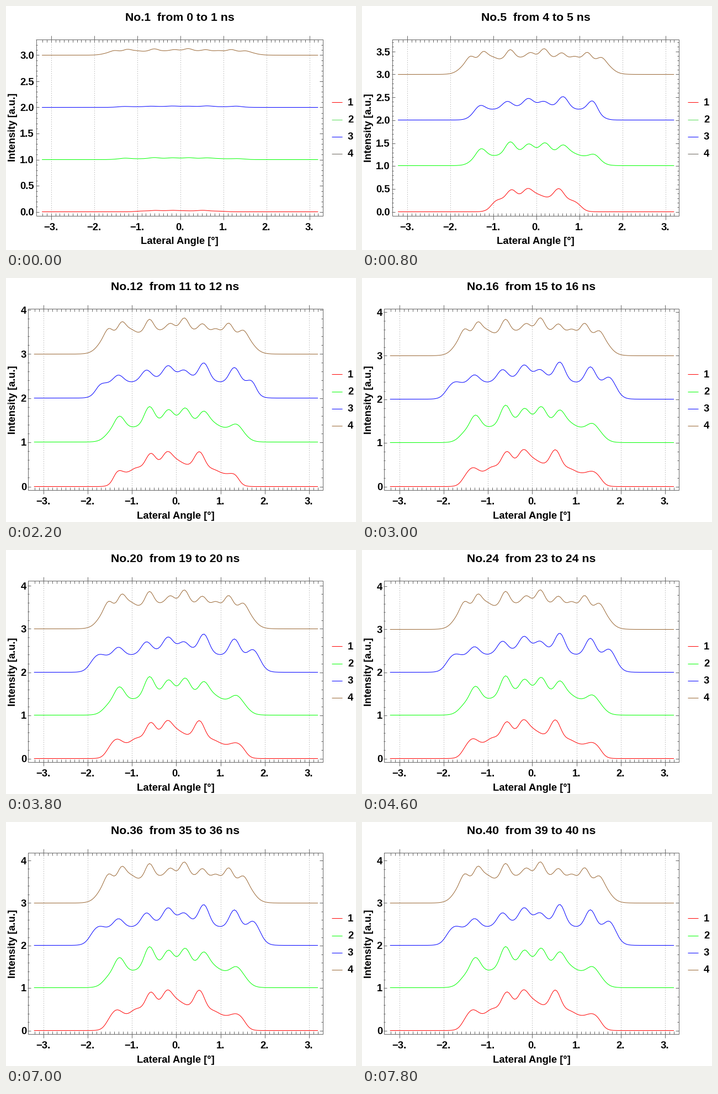
These frames come from a looping animation (634x444 px, 8 s). A matplotlib script:

```python
import math

import matplotlib.pyplot as plt
import numpy as np
from matplotlib.animation import FuncAnimation

W, H, DPI = 634, 444, 100
PX = 72 / DPI
FRAMES, STEP = 40, 200
SWITCH = 10          # first frame that uses the wide layout
RIGHT = 573
GRAY = "#666666"
COLORS = ["#ff0000", "#00ff00", "#0000ff", "#996633"]
NARROW_KEYS = ["#ff0000", "#58dc58", "#0000ff", "#6a655c"]
ANGLES = np.linspace(-3.2, 3.2, 161)

plt.rcParams["font.family"] = "Liberation Sans"
plt.rcParams["font.weight"] = "bold"

NARROW = dict(left=54, top=61, bottom=381, zero=374, peak=78, x0=315.2, dx=78,
              title=(314.5, 27), xtick=408, xlabel=(314, 433), edge=51,
              keys=NARROW_KEYS, major=0.5, minor=0.1, fmt="{:.1f}")
WIDE = dict(left=39, top=56, bottom=385, zero=379, peak=73, x0=307.9, dx=80.2,
            title=(306.5, 22), xtick=412, xlabel=(307, 438), edge=37,
            keys=COLORS, major=1, minor=0.2, fmt="{:.0f}")

# Each profile: a domed plateau with bumps (angle, height) of one width,
# cut off by soft edges that move outwards while the intensity builds up.
PROFILES = [
    dict(start=0.03, level=0.32, dome=0.5, edges=(1.07, 1.58), soft=0.06,
         width=0.17,
         bumps=[(-1.34, .17), (-.9, .14), (-.57, .49), (-.2, .46), (.03, .17),
                (.22, .08), (.53, .53), (.85, .09), (1.37, .08)]),
    dict(start=0.04, level=0.36, dome=0.55, edges=(1.52, 1.62), soft=0.08,
         width=0.16,
         bumps=[(-1.28, .35), (-.6, .5), (-.17, .34), (.21, .39), (.63, .37),
                (.85, .08), (1.37, .15)]),
    dict(start=0.03, level=0.4, dome=0.45, edges=(1.5, 1.95), soft=0.07,
         width=0.16,
         bumps=[(-1.75, .07), (-1.3, .22), (-.67, .28), (-.18, .32),
                (.18, .2), (.63, .47), (1.32, .43), (1.75, .2)]),
    dict(start=0.13, level=0.51, dome=0.3, edges=(1.75, 1.75), soft=0.09,
         width=0.13,
         bumps=[(-1.53, .23), (-1.22, .34), (-1.02, .11), (-.6, .34),
                (-.13, .17), (.19, .32), (.6, .22), (.9, .13), (1.19, .31),
                (1.53, .18)]),
]


def gain(n, start):
    """Fast turn-on followed by a slow drift to full intensity."""
    rise = 0.85 * (1 - math.exp(-n / 4.5)) + 0.15 * min(n / 36, 1)
    return start + (1 - start) * rise


def ease(t):
    t = min(max(t, 0), 1)
    return t * t * (3 - 2 * t)


def profile(p, n):
    inner, outer = p["edges"]
    edge = inner + (outer - inner) * ease((n - 6) / 8)
    y = p["level"] * (1 + p["dome"] * np.exp(-(ANGLES / 0.8) ** 2))
    for centre, height in p["bumps"]:
        y += height * np.exp(-((ANGLES - centre) / p["width"]) ** 2)
    window = 1 / (1 + np.exp((np.abs(ANGLES) - edge) / p["soft"]))
    return gain(n, p["start"]) * y * window


fig = plt.figure(figsize=(W / DPI, H / DPI), dpi=DPI, facecolor="white")
ax = fig.add_axes([0, 0, 1, 1])


def snap(v):
    return math.floor(v) + 0.5


def text(x, y, s, size=18.5, ha="center", **kw):
    ax.text(x, y, s, fontsize=size * PX, ha=ha, va="baseline", color="black",
            **kw)


def segments(parts):
    xs, ys = [], []
    for xa, ya, xb, yb in parts:
        xs += [xa, xb, np.nan]
        ys += [ya, yb, np.nan]
    ax.plot(xs, ys, color=GRAY, lw=PX, solid_capstyle="butt", zorder=2)


def draw_x_axis(lay):
    top, bottom = lay["top"], lay["bottom"]
    ticks = []
    for k in range(-32, 33):
        centre = lay["x0"] + lay["dx"] * k / 10
        x = snap(centre)
        major = k % 10 == 0
        out = 7 if major else 0
        ticks += [(x, top - out, x, top + 5),
                  (x, bottom + 1 + out, x, bottom - 4)]
        if major:
            ax.plot([x, x], [top + 1, bottom], color="#8c8c8c", lw=PX,
                    ls=(0, (1, 3)), dash_capstyle="butt", zorder=1)
            text(centre, lay["xtick"], f"{k // 10}.".replace("-", "\u2212"))
    segments(ticks)


def draw_y_axis(lay, scale):
    ticks = []
    every = round(lay["major"] / lay["minor"])
    count = int((lay["zero"] - lay["top"]) / scale / lay["minor"])
    for k in range(count + 1):
        y = snap(lay["zero"] - k * lay["minor"] * scale)
        major = k % every == 0
        size = 6 if major else 3
        ticks += [(lay["left"], y, lay["left"] + size, y),
                  (RIGHT + 1, y, RIGHT + 1 - size, y)]
        if major:
            text(lay["edge"], round(y + 6.6),
                 lay["fmt"].format(k * lay["minor"]), ha="right")
    segments(ticks)


def draw_frame(lay):
    l, r = lay["left"] + 0.5, RIGHT + 0.5
    t, b = lay["top"] + 0.5, lay["bottom"] + 0.5
    ax.plot([l, r, r, l, l], [t, t, b, b, t], color=GRAY, lw=PX, zorder=2,
            solid_joinstyle="miter")


def draw_legend(lay):
    for i, color in enumerate(lay["keys"]):
        y = 175.5 + 31 * i
        ax.plot([590, 609], [y, y], color=color, lw=PX, solid_capstyle="butt")
        text(619, 181 + 31 * i, str(i + 1), ha="left")


def update(n):
    ax.cla()
    ax.set_xlim(0, W)
    ax.set_ylim(H, 0)
    ax.axis("off")
    lay = NARROW if n < SWITCH else WIDE
    data = [profile(p, n) for p in PROFILES]
    highest = max(i + d.max() for i, d in enumerate(data))
    scale = (lay["zero"] - lay["peak"]) / highest

    draw_x_axis(lay)
    draw_y_axis(lay, scale)
    draw_frame(lay)
    for i, (d, color) in enumerate(zip(data, COLORS)):
        base = snap(lay["zero"] - i * scale)
        ax.plot(lay["x0"] + lay["dx"] * ANGLES, base - d * scale,
                color=color, lw=PX, zorder=3)
    draw_legend(lay)

    text(*lay["title"], f"No.{n + 1}  from {n} to {n + 1} ns", size=21.33)
    text(*lay["xlabel"], "Lateral Angle [\u00b0]")
    shown_half = (lay["zero"] - lay["top"]) / scale > 3.5
    text(17, 222 if shown_half else 221, "Intensity [a.u.]", rotation=90,
         rotation_mode="anchor")
    return []


anim = FuncAnimation(fig, update, frames=FRAMES, interval=STEP, repeat=True,
                     repeat_delay=0, blit=False)
plt.show()
```
